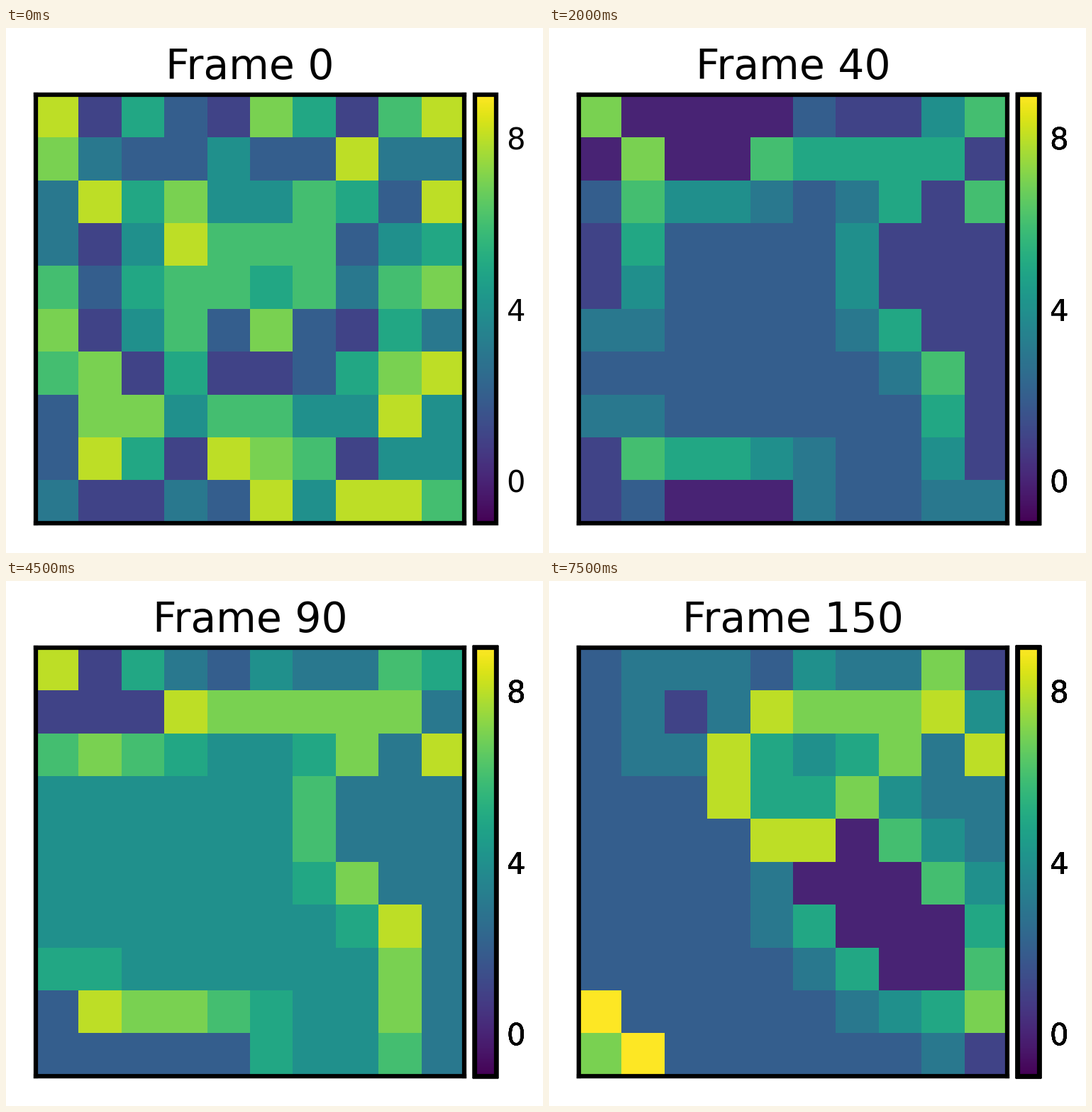
These frames come from a looping animation (757 by 740 pixels, 8 s). A matplotlib script:

```python
import numpy as np
import matplotlib.pyplot as plt
from matplotlib.animation import FuncAnimation

W, H, DPI = 757, 740, 100
FRAMES, STEPS = 16, 10
LEFT, BOTTOM, SIZE = 42, 42, 603.7
BAR_GAP, BAR_WIDTH = 15, 30.2

START = """
8152175168
7322422833
3857446528
3148666245
6256656367
7146272153
6715112578
2774664484
2851876144
3113284886
"""


def step(grid):
    """Add one to every cell; cells above nine flash, feed neighbours, reset."""
    grid = grid + 1
    flashed = np.zeros(grid.shape, bool)
    while True:
        fresh = (grid > 9) & ~flashed
        if not fresh.any():
            break
        flashed |= fresh
        for r, c in zip(*np.nonzero(fresh)):
            grid[max(r - 1, 0):r + 2, max(c - 1, 0):c + 2] += 1
    grid[flashed] = 0
    return grid


def run():
    grid = np.array([[int(ch) for ch in row] for row in START.split()])
    states = [grid]
    for _ in range(FRAMES - 1):
        for _ in range(STEPS):
            grid = step(grid)
        states.append(grid)
    return states


def add_axes(x, y, w, h):
    return fig.add_axes([x / W, y / H, w / W, h / H])


plt.rcParams.update({"font.family": "DejaVu Sans", "axes.linewidth": 4.5})
fig = plt.figure(figsize=(W / DPI, H / DPI), dpi=DPI, facecolor="white")
states = run()

ax = add_axes(LEFT, BOTTOM, SIZE, SIZE)
image = ax.imshow(states[0], cmap="viridis", vmin=-1, vmax=9,
                  interpolation="nearest", aspect="auto")
ax.set_xticks([])
ax.set_yticks([])
title = fig.text((LEFT + SIZE / 2) / W, 1 - 72 / H, "", fontsize=42,
                 ha="center", va="baseline")

# One more colour bar is stacked per frame, which darkens its soft edges.
bars = []
for _ in range(FRAMES):
    cax = add_axes(LEFT + SIZE + BAR_GAP, BOTTOM, BAR_WIDTH, SIZE)
    fig.colorbar(image, cax=cax, ticks=[0, 4, 8])
    cax.tick_params(length=0, pad=10.5, labelsize=30)
    bars.append(cax)


def update(k):
    image.set_data(states[k])
    title.set_text(f"Frame {k * STEPS}")
    for i, cax in enumerate(bars):
        cax.set_visible(i <= k)
    return image, title, *bars


anim = FuncAnimation(fig, update, frames=FRAMES, interval=500,
                     repeat=True, repeat_delay=0, blit=False)
plt.show()
```
